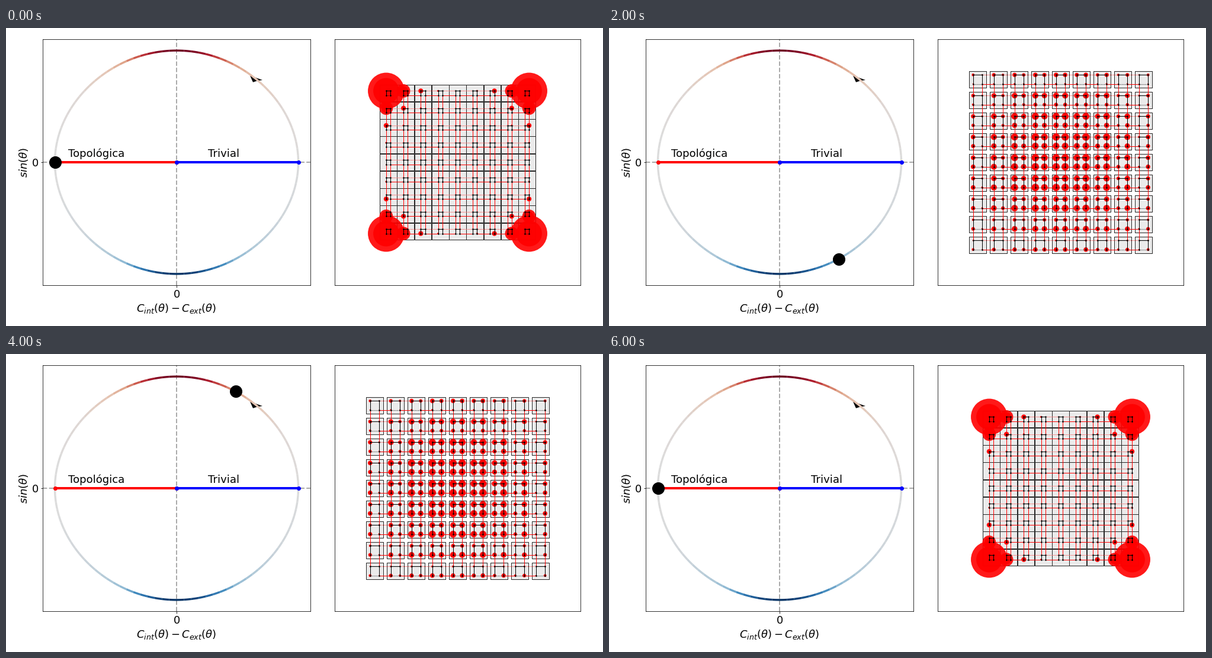
Recreate the animation shown at these times as a matplotlib script. Size 1008 by 504 pixels, loop 6.2 s.

```python
import numpy as np
import matplotlib.pyplot as plt
from matplotlib.animation import FuncAnimation
from matplotlib.collections import LineCollection, PolyCollection

W, H, DPI = 1008, 504, 72
FRAMES, INTERVAL = 31, 200
CELLS = 9
CX, CY, RX, RY = 288, 227, 205.5, 188.9
LX, LY = 762.5, 227
BOX = 28.65

plt.rcParams["font.family"] = "DejaVu Sans"
fig = plt.figure(figsize=(W / DPI, H / DPI), dpi=DPI, facecolor="white")


def pixel_axes(left, top, right, bottom):
    """Axes whose data coordinates are stage pixels."""
    ax = fig.add_axes([left / W, 1 - bottom / H, (right - left) / W, (bottom - top) / H])
    ax.set_xlim(left, right)
    ax.set_ylim(bottom, top)
    return ax


def orbit(theta):
    x = np.sinh(np.cos(theta) / 2) / np.sinh(0.5)
    return CX + RX * x, CY - RY * np.sin(theta)


# --- parameter loop ---
loop_ax = pixel_axes(62, 19, 514, 435)
loop_ax.set_xticks([CX], ["0"], fontsize=18)
loop_ax.set_yticks([CY], ["0"], fontsize=18)
loop_ax.set_xlabel(r"$C_{int}(\theta)-C_{ext}(\theta)$", fontsize=18)
loop_ax.set_ylabel(r"$sin(\theta)$", fontsize=18)
loop_ax.axvline(CX, color="#aaaaaa", ls="--", lw=2, zorder=1)
loop_ax.axhline(CY, color="#aaaaaa", ls="--", lw=2, zorder=1)
loop_ax.fill([412, 417, 424, 433], [80.5, 91.7, 89.4, 88], color="black", lw=0, zorder=2)

STOPS = [0, 10, 17, 23, 30, 40, 60, 90]
REDS = np.array([(103, 0, 31), (130, 10, 35), (178, 30, 45), (205, 92, 77),
                 (222, 160, 132), (229, 196, 178), (222, 214, 211), (220, 220, 220)])
BLUES = np.array([(5, 48, 97), (18, 68, 122), (38, 108, 168), (65, 138, 190),
                  (140, 184, 211), (176, 201, 216), (207, 213, 218), (220, 220, 220)])


def loop_color(theta):
    tilt = np.degrees(np.arccos(abs(np.sin(theta))))
    if np.cos(theta) < 0:
        tilt = min(90, 1.15 * tilt)
    ramp = REDS if np.sin(theta) > 0 else BLUES
    return [np.interp(tilt, STOPS, ramp[:, k]) / 255 for k in range(3)]


edges = np.linspace(0, 2 * np.pi, 101)
arcs = [np.column_stack(orbit(np.linspace(a, b, 5))) for a, b in zip(edges[:-1], edges[1:])]
arc_colors = [loop_color((a + b) / 2) for a, b in zip(edges[:-1], edges[1:])]
loop_ax.add_collection(LineCollection(arcs, colors=arc_colors, linewidths=3.4, zorder=3),
                       autolim=False)

for x0, x1, color in [(CX - RX, CX, "red"), (CX, CX + RX, "blue")]:
    loop_ax.plot([x0, x1], [CY, CY], color=color, lw=4, marker="o", ms=6, zorder=4)
for x, label in [(105, "Topológica"), (341, "Trivial")]:
    loop_ax.text(x, 218, label, fontsize=18, zorder=5)
dot, = loop_ax.plot([], [], "o", color="black", ms=20, zorder=6)

# --- lattice ---
grid_ax = pixel_axes(555, 19, 970, 435)
grid_ax.set_xticks([])
grid_ax.set_yticks([])

boxes = PolyCollection([], facecolors="#ebebeb", edgecolors="#262626", linewidths=1, zorder=1)
grid_ax.add_collection(boxes, autolim=False)
clouds = [grid_ax.scatter([], [], color="red", alpha=0.9, linewidths=0, zorder=2)
          for _ in range(2)]
links = {}
for color in ("red", "black"):
    for style in ("-", ":"):
        links[color, style] = LineCollection([], colors=color, linewidths=1,
                                             linestyles=style, zorder=3)
        grid_ax.add_collection(links[color, style], autolim=False)
sites, = grid_ax.plot([], [], "o", color="black", ms=2.7, mew=0, zorder=4)


def chain_density(c):
    """Mid-gap state of an SSH chain with couplings exp(c/2), exp(-c/2)."""
    n = 2 * CELLS
    hops = np.where(np.arange(n - 1) % 2 == 0, np.exp(c / 2), np.exp(-c / 2))
    energy, states = np.linalg.eigh(np.diag(hops, 1) + np.diag(hops, -1))
    # average the +E / -E pair for a mirror-symmetric profile
    density = (states[:, n // 2 - 1] ** 2 + states[:, n // 2] ** 2) / 2
    return (density + density[::-1]) / 2


def layout(c):
    inner = 11.95 * np.exp(c / 2)
    pitch = inner + 18.98 - 0.03 * c + 2.74 * c ** 2 + 0.25 * c ** 4
    centers = (np.arange(CELLS) - (CELLS - 1) / 2) * pitch
    spots = (centers[:, None] + np.array([-inner / 2, inner / 2])).ravel()
    return centers, spots


def lattice_links(xs, ys):
    out = {key: [] for key in links}
    n = len(xs)
    for i in range(n - 1):
        inside = i % 2 == 0
        color = "black" if inside else "red"
        for j in range(n):
            upper = j % 2 == 0
            style = "-" if upper == inside else ":"
            out[color, style].append([(xs[i], ys[j]), (xs[i + 1], ys[j])])
            out[color, "-"].append([(xs[j], ys[i]), (xs[j], ys[i + 1])])
    return out


def update(frame):
    theta = np.pi + 2 * np.pi * frame / (FRAMES - 1)
    c = np.cos(theta)
    x, y = orbit(theta)
    dot.set_data([x], [y])

    centers, spots = layout(c)
    h = BOX / 2
    boxes.set_verts([[(LX + u - h, LY + v - h), (LX + u + h, LY + v - h),
                      (LX + u + h, LY + v + h), (LX + u - h, LY + v + h)]
                     for v in centers for u in centers])

    xs, ys = LX + spots, LY + spots
    gx, gy = np.meshgrid(xs, ys)
    points = np.column_stack([gx.ravel(), gy.ravel()])
    density = chain_density(c)
    area = (2 * 71.3) ** 2 * np.outer(density, density).ravel()
    for cloud, share in zip(clouds, (1, 0.5)):
        cloud.set_offsets(points)
        cloud.set_sizes(area * share)
    for key, segments in lattice_links(xs, ys).items():
        links[key].set_segments(segments)
    sites.set_data(points[:, 0], points[:, 1])
    return [dot, boxes, *clouds, *links.values(), sites]


anim = FuncAnimation(fig, update, frames=FRAMES, init_func=lambda: update(0),
                     interval=INTERVAL, repeat=True, repeat_delay=0, blit=False)
plt.show()
```
